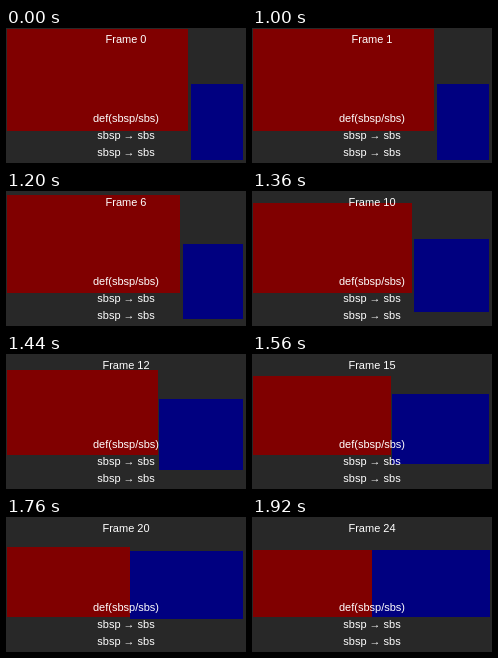
These frames come from a looping animation (240x135 px, 2.92 s). An HTML page with a canvas:

```html
<!DOCTYPE html>
<html lang="en">
<head>
<meta charset="utf-8">
<style>
  html, body { margin: 0; width: 100%; height: 100%; overflow: hidden; background: #282828; }
  canvas { display: block; }
</style>
</head>
<body>
<canvas id="stage" width="240" height="135"></canvas>
<script>
const ctx = document.getElementById('stage').getContext('2d');
const LOOP = 2920, HOLD = 1000, STEP = 40, LAST = 24;

// Edges at the start and end: left, top, right, bottom.
const BOXES = [
  { color: '#800000', from: [1, 1, 182, 103], to: [1, 33, 120, 100] },
  { color: '#000080', from: [185, 56, 237, 132], to: [120, 33, 238, 100] }
];

// Sine ease in and out over the moving steps.
function progress(step) {
  const t = Math.min(1, Math.max(0, (step - 0.8) / (LAST - 1)));
  return (1 - Math.cos(Math.PI * t)) / 2;
}

function drawBox({ color, from, to }, p) {
  // The small bias keeps resting edges from rounding down.
  const [left, top, right, bottom] =
    from.map((v, i) => Math.floor(v + (to[i] - v) * p + 0.06));
  ctx.fillStyle = color;
  ctx.fillRect(left, top, right - left, bottom - top);
}

function draw(now) {
  const time = now % LOOP;
  const step = time < HOLD ? 0 : Math.min(LAST, 1 + Math.floor((time - HOLD) / STEP));
  const p = progress(step);

  ctx.fillStyle = '#282828';
  ctx.fillRect(0, 0, 240, 135);
  BOXES.forEach(box => drawBox(box, p));

  ctx.font = '11px "Liberation Sans", Arial, sans-serif';
  ctx.textAlign = 'center';
  ctx.fillStyle = '#fff';
  ctx.fillText('Frame ' + step, 120, 15);
  ['def(sbsp/sbs)', 'sbsp → sbs', 'sbsp → sbs']
    .forEach((line, i) => ctx.fillText(line, 120, 94 + 17 * i));
}

const origin = performance.now();
function tick() {
  draw(performance.now() - origin);
  requestAnimationFrame(tick);
}
tick();
</script>
</body>
</html>
```
